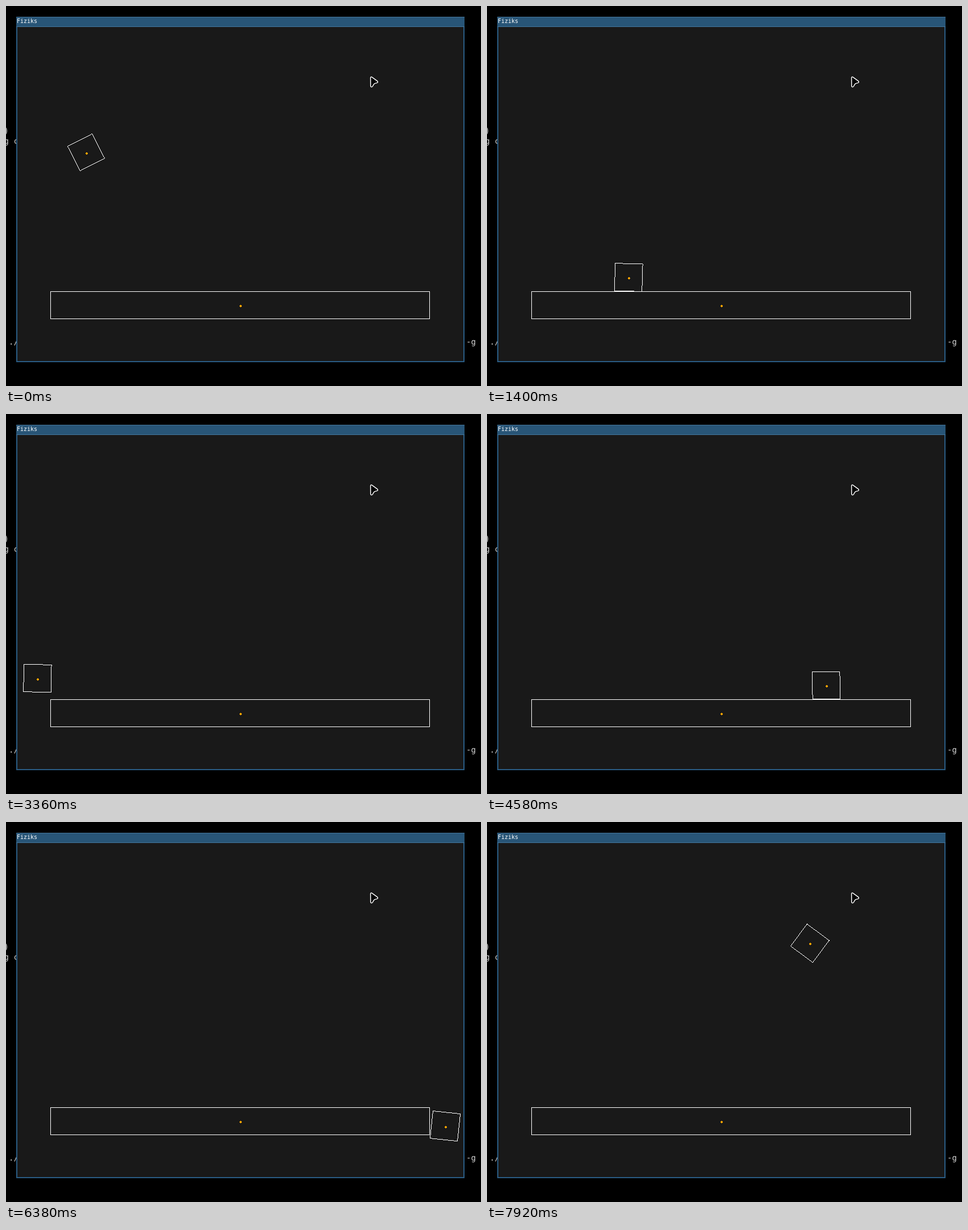
These frames come from a looping animation (836 px wide and 670 px high, 8000 ms). An HTML page with a canvas:

```html
<!DOCTYPE html>
<html lang="en">
<head>
<meta charset="utf-8">
<title>Fiziks</title>
<style>
  html, body { margin: 0; width: 100%; height: 100%; overflow: hidden; background: #000; }
  svg, canvas { position: absolute; left: 0; top: 0; width: 836px; height: 670px; }
  text { font-family: "DejaVu Sans Mono", monospace; white-space: pre; }
  .terminal { font-size: 14px; fill: #d0d0d0; }
  .title { font-size: 10px; fill: #fff; }
</style>
</head>
<body>
<svg viewBox="0 0 836 670">
  <g class="terminal">
    <text x="-3.4" y="225">)</text>
    <text x="-3.4" y="243">g c</text>
    <text x="5" y="597">./</text>
    <text x="810" y="597">-g</text>
  </g>
  <g shape-rendering="crispEdges">
    <rect x="18" y="19" width="789" height="609" fill="#2a5c84"/>
    <rect x="18" y="19" width="789" height="18" fill="#43749a"/>
    <rect x="18" y="20" width="789" height="16" fill="#285577"/>
    <rect x="20" y="37" width="785" height="589" fill="#191919"/>
  </g>
  <text class="title" x="19" y="30">Fiziks</text>
  <path d="M641.600 126.500Q641.800 124.300 644 125.400L653.600 132.400Q655.600 134.600 652.600 135.600L649 136.600Q647.600 137.200 646.800 138.800L645 142Q642.400 144 641.700 141Z"
        fill="#000" stroke="#fff" stroke-width="1.5" stroke-linejoin="round"/>
</svg>
<canvas width="836" height="670"></canvas>
<script>
const LOOP = 8000, REFRESH = 20;
const GRAVITY = 1390, LIFT = -GRAVITY, HANG = -350;
const HALF = 24.2, FLOOR = 478, EDGE_Y = 502, LEFT = 79, RIGHT = 745;

const ctx = document.querySelector('canvas').getContext('2d');
ctx.beginPath();
ctx.rect(20, 37, 785, 589);
ctx.clip();

function rotate(x, y, degrees) {
  const r = degrees * Math.PI / 180, c = Math.cos(r), s = Math.sin(r);
  return [x * c - y * s, x * s + y * c];
}

// Travel from a to b in the given seconds under constant acceleration.
const glide = (a, b, accel, seconds, u) =>
  a + (b - a) * u - accel * seconds * seconds * u * (1 - u) / 2;

// Each phase starts from the pose in which the one before it ended.
const phases = [];
let pose = { x: 140.5, y: 257.5, angle: -27 }, clock = 0;

function addPhase(end, poseAt) {
  phases.push({ start: clock, end, poseAt });
  pose = poseAt(1);
  clock = end;
}

function move(end, x, y, angle, ax = 0, ay = 0) {
  const from = pose, seconds = (end - clock) / 1000;
  addPhase(end, u => ({
    x: glide(from.x, x, ax, seconds, u),
    y: glide(from.y, y, ay, seconds, u),
    angle: glide(from.angle, angle, 0, seconds, u)
  }));
}

const slide = (end, x, ax, angle = 90) => move(end, x, FLOOR, angle, ax);

// Topple around a platform corner, gaining speed.
function tip(end, cornerX, turn) {
  const from = pose;
  addPhase(end, u => {
    const [dx, dy] = rotate(from.x - cornerX, from.y - EDGE_Y, turn * u * u);
    return { x: cornerX + dx, y: EDGE_Y + dy, angle: from.angle + turn * u * u };
  });
}

move(1185, 286, FLOOR, 92, -210, GRAVITY);
slide(2400, 75.2, 0);
tip(3030, LEFT, -90);
move(3360, 54.85, 465.5, 1.2, 650, LIFT);
move(3870, 195, FLOOR, 90, 560, GRAVITY);
slide(4140, 342, 800);
slide(4580, 596.5, -300, 89.3);
slide(5000, 724, -960);
slide(5250, 747.5, -100);
tip(5790, RIGHT, 90);
move(6380, 772.5, 535.6, 186, -80, HANG);
move(6720, 769, 494, 180, 0, HANG);
tip(7095, RIGHT, -90);
move(7920, 567.8, 213.3, -53.5, 0, GRAVITY);

function poseAt(t) {
  const { start, end, poseAt } = phases.find(phase => t < phase.end) ?? phases.at(-1);
  return poseAt(Math.min(1, (t - start) / (end - start)));
}

// Hard-edged one-pixel line.
function line([x0, y0], [x1, y1]) {
  const steep = Math.abs(y1 - y0) > Math.abs(x1 - x0);
  let [a, b, c, d] = steep ? [y0, x0, y1, x1] : [x0, y0, x1, y1];
  if (a > c) [a, b, c, d] = [c, d, a, b];
  for (let m = Math.round(a); m <= Math.round(c); m++) {
    const n = Math.round(b + (d - b) * (m - a) / (c - a));
    ctx.fillRect(steep ? n : m, steep ? m : n, 1, 1);
  }
}

function drawBody({ x, y, angle }, halfW, halfH) {
  const corners = [[-1, -1], [1, -1], [1, 1], [-1, 1]].map(([sx, sy]) => {
    const [dx, dy] = rotate(sx * halfW, sy * halfH, angle);
    return [x + dx, y + dy];
  });
  ctx.fillStyle = '#fff';
  corners.forEach((p, i) => line(p, corners[(i + 1) % 4]));
  const cx = Math.round(x) + 1, cy = Math.round(y) + 2;
  ctx.fillStyle = '#ffa500';
  ctx.fillRect(cx - 2, cy - 1, 4, 2);
  ctx.fillRect(cx - 1, cy - 2, 2, 4);
}

const platform = { x: 411.5, y: 527, angle: 0 };
const began = performance.now();

function draw() {
  const now = (performance.now() - began) % LOOP;
  ctx.clearRect(0, 0, 836, 670);
  drawBody(platform, 333.5, 24);
  drawBody(poseAt(Math.floor(now / REFRESH) * REFRESH), HALF, HALF);
  requestAnimationFrame(draw);
}
draw();
</script>
</body>
</html>
```
